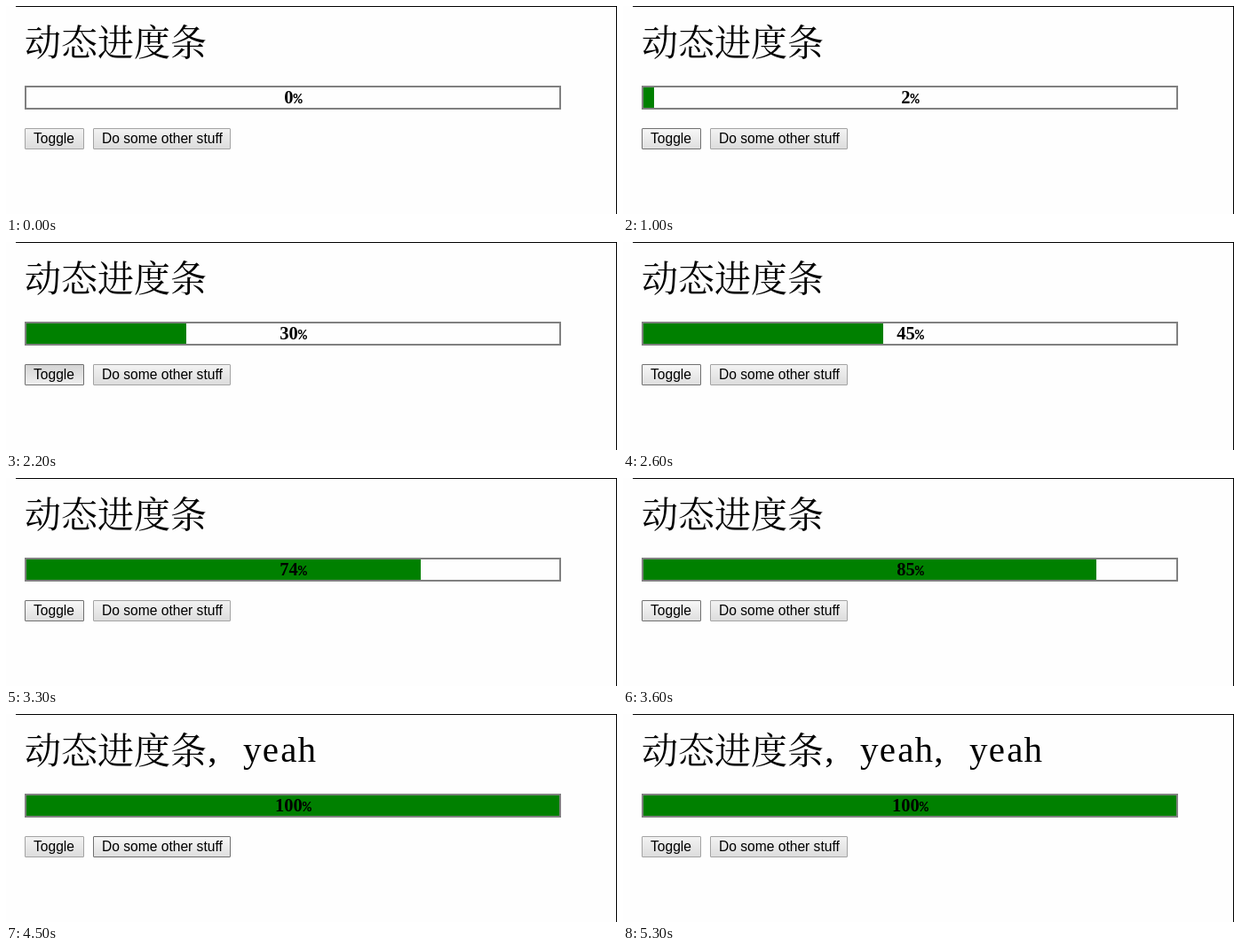
Write an HTML page that moves like this. It is 688 px wide and 235 px high and loops after 6.3 s.

```html
<!DOCTYPE html>
<html lang="zh">
<head>
<meta charset="utf-8">
<title>动态进度条</title>
<style>
  html, body { margin: 0; width: 100%; height: 100%; overflow: hidden; background: #fefefe; }
  svg { display: block; }
  text { white-space: pre; }
  .title { font-size: 41px; text-anchor: middle; }
  .cjk { font-family: "Noto Serif CJK SC", "Noto Sans CJK SC", "Noto Sans CJK", serif; font-weight: 300; }
  .latin { font-family: "Liberation Serif", serif; }
  .value { font: bold 20.5px "Liberation Serif", serif; text-anchor: middle; }
  .sign { font: bold 17px "Liberation Mono", monospace; }
  .button text { font: 15.6px "Liberation Sans", Arial, sans-serif; }
  .button rect { fill: url(#face); stroke: #a3a3a3; }
  .button.hover rect { fill: url(#faceHover); stroke: #707070; }
  .button.press rect { fill: url(#facePress); stroke: #707070; }
</style>
</head>
<body>
<svg width="688" height="235" viewBox="0 0 688 235">
  <defs>
    <linearGradient id="face" x2="0" y2="1"><stop stop-color="#f3f3f3"/><stop offset="1" stop-color="#dcdcdc"/></linearGradient>
    <linearGradient id="faceHover" x2="0" y2="1"><stop stop-color="#f8f8f8"/><stop offset="1" stop-color="#dedede"/></linearGradient>
    <linearGradient id="facePress" x2="0" y2="1"><stop stop-color="#d4d4d4"/><stop offset="1" stop-color="#efefef"/></linearGradient>
  </defs>
  <path d="M11 0H688V235H687V1H11Z"/>
  <text class="title cjk" y="56" id="heading">动态进度条</text>
  <text class="title latin" y="54" id="suffix"></text>
  <rect id="fill" x="23" y="92" height="23" fill="#008000"/>
  <rect x="22" y="91" width="602" height="25" fill="none" stroke="#808080" stroke-width="2"/>
  <text class="value" y="110" id="value"><tspan id="digits"></tspan><tspan class="sign" id="sign">%</tspan></text>
  <g class="button" id="toggle">
    <rect x="21.5" y="138.5" width="66" height="23" rx="0.5"/>
    <text x="31" y="155">Toggle</text>
  </g>
  <g class="button" id="stuff">
    <rect x="98.5" y="138.5" width="154" height="23" rx="0.5"/>
    <text x="108" y="155">Do some other stuff</text>
  </g>
</svg>
<script>
const LOOP = 6300, TICK = 100;
const EM = 41, LEFT = 21, CENTER = 323.5, CELL = 10.25;
const $ = id => document.getElementById(id);

// [time, percent]
const progress = [
  [900, 0], [1000, 2], [1500, 21], [1700, 29], [1800, 30], [2200, 30], [2300, 33],
  [2600, 45], [2800, 53], [3300, 74], [3500, 81], [3900, 98], [4000, 100]
];
// [time, state]
const toggleSteps = [
  [0, ""], [600, "hover"], [900, "press"], [1000, "hover"], [1700, "press"],
  [1800, "hover"], [2200, "press"], [2300, "hover"], [3700, ""]
];
const stuffSteps = [
  [0, ""], [200, "hover"], [600, ""], [3900, "hover"], [4400, "press"],
  [4500, "hover"], [5000, "press"], [5100, "hover"], [5300, ""]
];
const suffixSteps = [[0, ""], [4500, ", yeah"], [5100, ", yeah, yeah"]];

const stepAt = (steps, t) => steps.findLast(s => s[0] <= t)[1];

function percentAt(t) {
  const i = progress.findIndex(p => p[0] > t);
  if (i === 0) return 0;
  if (i < 0) return 100;
  const [t0, p0] = progress[i - 1], [t1, p1] = progress[i];
  return Math.round(p0 + (p1 - p0) * (t - t0) / (t1 - t0));
}

// Each character is centred in a cell of fixed pitch.
function setCells(el, text, start, pitch, commaShift = 0) {
  el.textContent = text;
  el.setAttribute("x", [...text].map((c, i) =>
    start + (i + 0.5) * pitch + (c === "," ? commaShift : 0)).join(" "));
}

function render(now) {
  const t = Math.floor(now % LOOP / TICK) * TICK;
  const percent = percentAt(t), number = String(percent);
  const start = CENTER - (number.length + 1) * CELL / 2;
  $("fill").setAttribute("width", percent * 6);
  setCells($("digits"), number, start, CELL);
  setCells($("sign"), "%", start + number.length * CELL, CELL);
  setCells($("suffix"), stepAt(suffixSteps, t), LEFT + 5 * EM, EM / 2, -4);
  $("toggle").setAttribute("class", "button " + stepAt(toggleSteps, t));
  $("stuff").setAttribute("class", "button " + stepAt(stuffSteps, t));
}

setCells($("heading"), "动态进度条", LEFT, EM);
const begin = performance.now();
function loop() {
  render(performance.now() - begin);
  requestAnimationFrame(loop);
}
loop();
</script>
</body>
</html>
```
